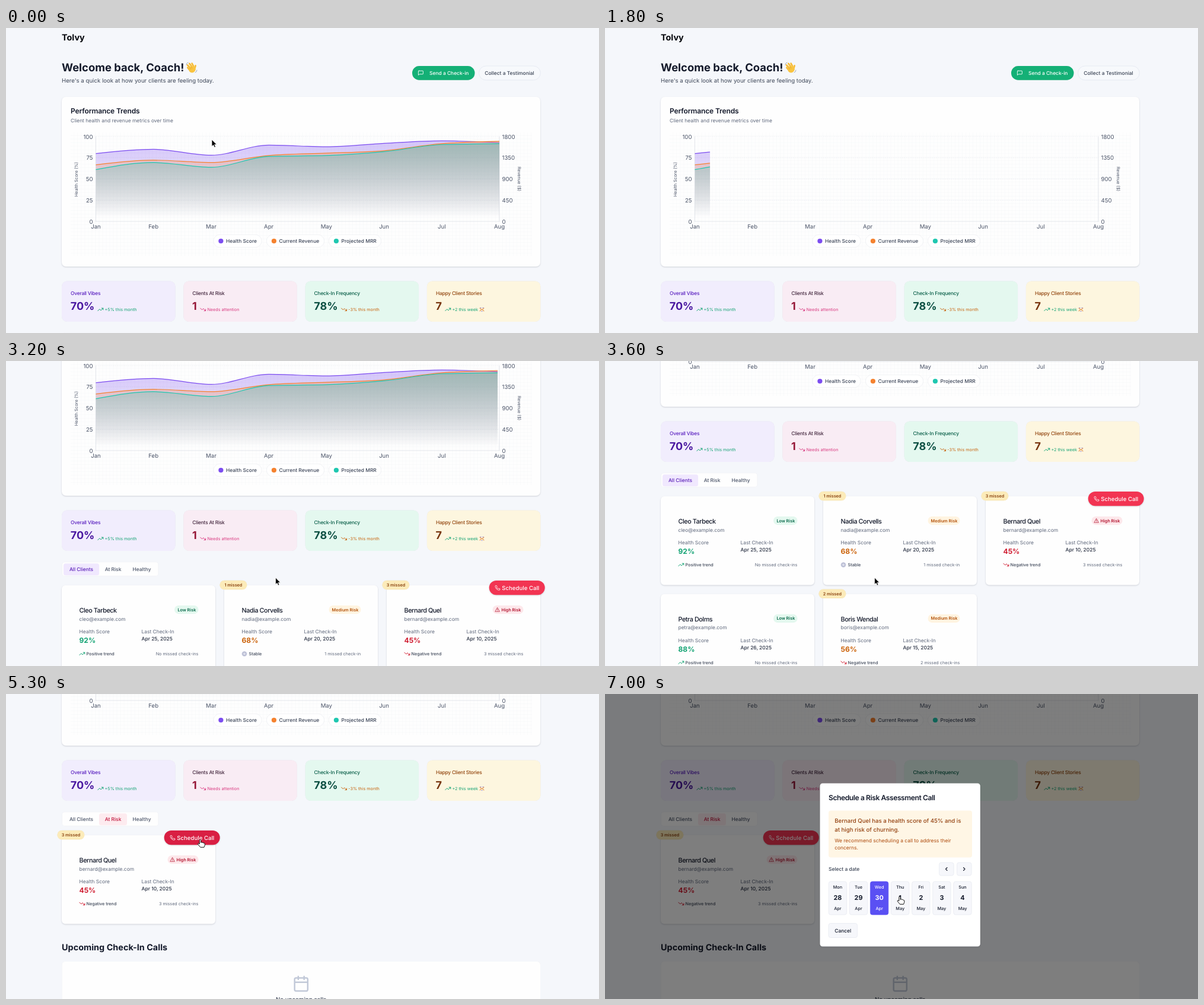
Recreate the animation shown at these times as an HTML page. Size 1000x514 px, loop 7.1 s.

```html
<!DOCTYPE html>
<html lang="en">
<head>
<meta charset="utf-8">
<title>Coach dashboard</title>
<style>
html, body { margin: 0; width: 100%; height: 100%; overflow: hidden; background: #f5f7fb; }
svg { display: block; width: 100%; height: 100%; }
text { font-family: Inter, "Open Sans", sans-serif; text-rendering: geometricPrecision; white-space: pre; }
.card { filter: drop-shadow(0 1.2px 1.3px rgba(15, 23, 42, .17)); }
.soft { filter: drop-shadow(0 .6px .7px rgba(15, 23, 42, .1)); }
.line { fill: none; stroke-linecap: round; stroke-linejoin: round; }
</style>
</head>
<body>
<svg id="stage" viewBox="0 0 1000 514" preserveAspectRatio="none"></svg>
<script>
const LOOP = 7100, STEP = 100;
const XS = 7.22, SM = 8.43, MD = 9.63, LG = 10.84, XL = 12.04, H2 = 14.45, H1 = 18.06;
const INK = '#141a2b', SLATE = '#4b5468', MUTED = '#5f687c';
const GREEN = '#14a374', RED = '#d01f33', ORANGE = '#cc640c';

// Drawing helpers
const text = (x, y, size, str, fill = INK, weight = 400, more = '') =>
  `<text x="${x}" y="${y}" font-size="${size}" fill="${fill}" font-weight="${weight}" ${more}>${str}</text>`;
const mid = 'text-anchor="middle"', end = 'text-anchor="end"';
const track = v => `letter-spacing="${v}"`;
const box = (x, y, w, h, r, fill, more = '') =>
  `<rect x="${x}" y="${y}" width="${w}" height="${h}" rx="${r}" fill="${fill}" ${more}/>`;
const line = (d, color, width = 1, more = '') =>
  `<path class="line" d="${d}" stroke="${color}" stroke-width="${width}" ${more}/>`;
const icon = (x, y, scale, d, color, width = 2) =>
  `<g transform="translate(${x} ${y}) scale(${scale})">${line(d, color, width)}</g>`;
const group = (id, body) => `<g id="${id}">${body}</g>`;

const UP = 'M2 17L8.5 10.5L13.5 15.5L22 7M16 7H22V13';
const DOWN = 'M2 7L8.5 13.5L13.5 8.5L22 17M16 17H22V11';
const PHONE = 'M22 17v3a2 2 0 0 1-2 2C10 22 2 13 2 4a2 2 0 0 1 2-2h3a2 2 0 0 1 2 2l1 4-2 3a16 16 0 0 0 5 5l3-2 4 1a2 2 0 0 1 2 2z';
const ALERT = 'M12 3L22 21H2ZM12 9V14M12 17.5V18';
const CHAT = 'M4 3H20Q22 3 22 5V15Q22 17 20 17H7L2 21V5Q2 3 4 3Z';
const CALENDAR = 'M5 4H19Q21 4 21 6V20Q21 22 19 22H5Q3 22 3 20V6Q3 4 5 4ZM3 10H21M8 2V6M16 2V6';

// Chart
const LEFT = 151.5, WIDE = 680.5, TOP = 183, BASE = 326, GAP = WIDE / 7;
const series = [
  { id: 'health', name: 'Health Score', color: '#7c4df0', max: 100, data: [80, 85, 78, 90, 88, 92, 95, 93], x: 350, w: 81 },
  { id: 'now', name: 'Current Revenue', color: '#f5822f', max: 1800, data: [1200, 1300, 1250, 1400, 1450, 1500, 1650, 1700], x: 439.5, w: 97 },
  { id: 'mrr', name: 'Projected MRR', color: '#1fc7b0', max: 1800, data: [1100, 1250, 1150, 1380, 1400, 1480, 1630, 1650], x: 544.5, w: 88 }
];

// Monotone cubic through evenly spaced points
function curve(s) {
  const y = s.data.map(v => BASE - v / s.max * (BASE - TOP));
  const d = y.slice(1).map((v, i) => v - y[i]);
  const m = y.map((_, i) => {
    if (i === 0 || i === 7) return 0;
    const a = d[i - 1], b = d[i];
    return a * b <= 0 ? 0 : Math.sign(a) * Math.min(Math.abs(a), Math.abs(b), Math.abs(a + b) / 4) * 2;
  });
  m[0] = (3 * d[0] - m[1]) / 2;
  m[7] = (3 * d[6] - m[6]) / 2;
  let path = `M${LEFT} ${y[0]}`;
  for (let i = 0; i < 7; i++) {
    const x = LEFT + i * GAP;
    path += `C${x + GAP / 3} ${y[i] + m[i] / 3} ${x + GAP * 2 / 3} ${y[i + 1] - m[i + 1] / 3} ${x + GAP} ${y[i + 1]}`;
  }
  return path;
}

function chart() {
  let out = box(109, 176, 778, 208, 0, 'url(#mesh)');
  for (let i = 0; i < 5; i++) {
    const y = BASE - i * (BASE - TOP) / 4;
    out += line(`M${LEFT} ${y}H${LEFT + WIDE}`, i ? '#eceef2' : '#dde0e6', .7, i ? 'stroke-dasharray="1.8 1.8"' : '');
    out += text(146.5, y + 3.5, MD, i * 25, SLATE, 400, end) + text(836.5, y + 3.5, MD, i * 450, SLATE);
  }
  out += line(`M${LEFT} ${TOP}V${BASE}M${LEFT + WIDE} ${TOP}V${BASE}`, '#d9dce3', .7);
  ['Jan', 'Feb', 'Mar', 'Apr', 'May', 'Jun', 'Jul', 'Aug'].forEach((name, i) => {
    out += text(LEFT + i * GAP, 338, MD, name, SLATE, 400, mid);
  });
  out += text(0, 0, XS, 'Health Score (%)', SLATE, 400, mid + ' transform="translate(121 255) rotate(-90)"');
  out += text(0, 0, XS, 'Revenue ($)', SLATE, 400, mid + ' transform="translate(862.5 254.5) rotate(90)"');
  out += '<g clip-path="url(#reveal)">' + series.map(s => {
    const d = curve(s);
    return `<path d="${d}V${BASE}H${LEFT}Z" fill="url(#${s.id})"/>` + line(d, s.color, 1.2);
  }).join('') + '</g>';
  series.forEach(s => {
    out += box(s.x, 348.5, s.w, 21, 10.5, '#fff', 'class="soft" stroke="#f1f3f6" stroke-width=".6"');
    out += `<circle cx="${s.x + 12.4}" cy="359" r="4.1" fill="${s.color}"/>` + text(s.x + 21, 362, SM, s.name, '#3c4558', 500);
  });
  return out;
}

function wave() {
  const hand = line('M-5 1L-6-3M-2-1L-4.5-7M1-2L-.5-8M4-1L3.5-6.5', '#f7bd38', 2.7)
    + line('M4.5 3L7.5-.5', '#f7bd38', 2.7)
    + '<ellipse cx="-.2" cy="3" rx="5.8" ry="5.3" fill="#f9c440"/>'
    + line('M-3.4-1L-2 1.5M-.5-2L.5 1', '#dc9520', .6);
  return `<g transform="translate(313 67) rotate(-24)">${hand}</g>`
    + line('M304 62Q304 59 307 58M319 75Q322 74 322 71', '#8d97a5', .8);
}

function header() {
  return text(94, 21.3, H2, 'Tolvy', '#05070c', 700)
    + text(94, 73.3, 18.4, 'Welcome back, Coach!', INK, 700) + wave()
    + text(94, 92.3, MD, 'Here\'s a quick look at how your clients are feeling today.', '#3f4859')
    + box(685, 64, 105.5, 23.8, 11.9, '#14b076', 'class="soft"') + icon(694.6, 71, .4, CHAT, '#fff', 2.2)
    + text(714, 79, SM, 'Send a Check-in', '#fff', 500)
    + box(797.5, 64, 103.8, 23.8, 11.9, '#f7f9fc', 'stroke="#e3e8f0" stroke-width=".8"')
    + text(807.3, 79, SM, 'Collect a Testimonial', '#3a4354', 500)
    + box(94, 116, 807, 286, 7, '#fefefe', 'class="card"')
    + text(109, 143.5, XL, 'Performance Trends', INK, 600, track(-.14))
    + text(109, 158.6, SM, 'Client health and revenue metrics over time', MUTED);
}

const stats = [
  ['Overall Vibes', '70%', '+5% this month', '#f1edfd', '#5b21c0', '#4a18a0', GREEN, UP, 60],
  ['Clients At Risk', '1', 'Needs attention', '#f9ecf4', '#44283f', '#961838', '#d93a80', DOWN, 27.5],
  ['Check-In Frequency', '78%', '-3% this month', '#e4f8ef', '#0a5f49', '#0b4f42', '#c96511', DOWN, 60],
  ['Happy Client Stories', '7', '+2 this week', '#fdf6df', '#92450e', '#78350f', GREEN, UP, 30]
];
const statCards = () => stats.map(([label, value, note, bg, c1, c2, c3, trend, dx], i) => {
  const x = 94 + i * 205.3;
  return box(x, 426.5, 191.5, 68.5, 9, bg, 'class="soft"')
    + text(x + 15, 450.2, SM, label, c1, 500, track(-.23))
    + text(x + 14.7, 475.2, H1, value, c2, 700)
    + icon(x + dx, 469, .45, trend, c3, 2.2) + text(x + dx + 12.6, 477.2, XS, note, c3);
}).join('')
  + line('M799 472L802 474.5L799 477M806 472L803 474.5L806 477', '#e59a55', 1.1)
  + line('M800 471.5H801M804 471.5H805M802 477.5H803', '#8a7bd0', 1.1);

// Clients: name, mailbox, risk level, score, date, missed check-ins
const clients = [
  ['Cleo Tarbeck', 'cleo', 0, 92, 25, 0],
  ['Nadia Corvells', 'nadia', 1, 68, 20, 1],
  ['Bernard Quel', 'bernard', 2, 45, 10, 3],
  ['Petra Dolms', 'petra', 0, 88, 26, 0],
  ['Boris Wendal', 'boris', 1, 56, 15, 2]
];
const levels = [
  ['Low Risk', 40.5, '#e4f8ef', '#0c6b4d', GREEN],
  ['Medium Risk', 54, '#fff4e1', '#b3520a', ORANGE],
  ['High Risk', 52, '#fde8eb', '#b31530', RED]
];

function clientCard([name, mail, risk, score, day, missed], slot, callId) {
  const [label, w, bg, fg, tone] = levels[risk];
  const stable = missed === 1, bad = missed > 1;
  let out = box(0, 0, 259, 149.5, 6, '#fefefe', 'class="card"')
    + text(29.5, 46.2, LG, name, INK, 500, track(-.45))
    + text(29.5, 59.7, SM, mail + '@example.com', MUTED)
    + box(230.5 - w, 34, w, 14.2, 7.1, bg)
    + text(226.3, 43.6, XS, label, fg, 600, end)
    + text(29.5, 81.3, SM, 'Health Score', MUTED) + text(134.5, 81.3, SM, 'Last Check-In', MUTED)
    + text(29.5, 97, XL, score + '%', tone, 700)
    + text(134.5, 93.3, SM, `Apr ${day}, 2025`, '#262e40', 500)
    + text(41.5, 118, XS, stable ? 'Stable' : bad ? 'Negative trend' : 'Positive trend', '#3d4658', 500)
    + text(230.3, 118, XS, missed ? `${missed} missed check-in${bad ? 's' : ''}` : 'No missed check-ins', MUTED, 400, end);
  out += stable
    ? '<circle cx="34" cy="115.5" r="4.6" fill="#d9dbe9"/><circle cx="34" cy="115.5" r="3" fill="none" stroke="#a3a8c4"/>'
    : icon(29, 110, .45, bad ? DOWN : UP, bad ? RED : GREEN, 2.2);
  if (risk === 2) {
    out += icon(182.5, 36.7, .36, ALERT, fg)
      + box(172.7, -8, 94, 24.2, 12.1, '#f23452', `id="${callId}" class="card"`)
      + icon(182.3, -.2, .38, PHONE, '#fff', 2.2) + text(194.3, 7.6, MD, 'Schedule Call', '#fff', 500);
  }
  if (missed) out += box(-7.6, -8.2, 46, 15.4, 7.7, '#fcebb9', 'class="soft"')
    + text(15.4, 1.8, XS, missed + ' missed', '#8a4310', 600, mid);
  return `<g transform="translate(${94 + slot % 3 * 274} ${553 + (slot > 2 ? 164.8 : 0)})">${out}</g>`;
}

function tabs(active) {
  const items = [['All Clients', 97, 60, '#f0e8fe', '#5a1fb8'], ['At Risk', 157, 47, '#fdebef', '#c0163c'], ['Healthy', 204, 50]];
  return box(94.5, 513.8, 162.5, 23.6, 4, '#fefefe', 'stroke="#eceff4" stroke-width=".6"')
    + items.map(([name, x, w, bg, fg], i) =>
      (i === active ? box(x, 516.3, w, 20, 3.5, bg) : '')
      + text(x + w / 2, 529.2, SM, name, i === active ? fg : SLATE, 500, mid)).join('');
}

const upcoming = dy => `<g transform="translate(0 ${dy})">`
  + text(94, 747, H2, 'Upcoming Check-In Calls', INK, 700)
  + box(94.3, 766, 806.7, 150, 5, '#fefefe', 'class="soft"')
  + icon(483, 788.5, 1.23, CALENDAR, '#c2c9d8', 2)
  + text(497.7, 833, MD, 'No upcoming calls', '#3d4658', 500, mid) + '</g>';

function modal() {
  const panel = (x, y, w, h, id = '') => box(x, y, w, h, 3.5, '#f6f7fb', `stroke="#e6e9ef" stroke-width=".7" ${id}`);
  let out = box(362.5, 150.5, 270.3, 275, 4.5, '#fff', 'class="card"')
    + text(377, 178.5, XL, 'Schedule a Risk Assessment Call', INK, 600, track(-.4))
    + box(377, 196.5, 242, 79, 4, '#fff6e5')
    + text(387.2, 217, MD, 'Bernard Quel has a health score of 45% and is', '#93400f', 500)
    + text(387.2, 231.6, MD, 'at high risk of churning.', '#93400f', 500)
    + text(387.2, 249.5, SM, 'We recommend scheduling a call to address their', '#ad4b0d')
    + text(387.2, 261.5, SM, 'concerns.', '#ad4b0d')
    + text(377, 298.4, SM, 'Select a date', '#3a4354', 500)
    + panel(563.5, 284, 24.6, 22) + panel(593.5, 284, 24.6, 22)
    + line('M577 292.5L574.5 295L577 297.5M604.5 292.5L607 295L604.5 297.5', INK, 1.1)
    + panel(377, 386.5, 48.5, 24) + text(401.2, 401.5, SM, 'Cancel', INK, 500, mid);
  ['Mon', 'Tue', 'Wed', 'Thu', 'Fri', 'Sat', 'Sun'].forEach((name, i) => {
    const x = 377.2 + i * 35.1, c = x + 15.2;
    const label = text(c, 328, XS, name, 'inherit', 500, mid)
      + text(c, 347.4, LG, i < 3 ? 28 + i : i - 2, 'inherit', 700, mid)
      + text(c, 364, XS, i < 3 ? 'Apr' : 'May', 'inherit', 500, mid);
    out += panel(x, 316, 30.4, 56, `id="cell${i}"`) + `<g id="label${i}" fill="${INK}">${label}</g>`;
  });
  return out;
}

const cursors = `<path id="arrow" d="M0 0V11.6L2.7 9.2L4.5 13.2L6.5 12.3L4.7 8.5H8.3Z" fill="#000" stroke="#fff" stroke-width=".8"/>
<path id="hand" d="M-1.2 1Q-1.2-.2 0-.2T1.2 1V5Q1.5 4 2.5 4.2Q3.6 4.3 3.7 5.2Q4.4 4.5 5.3 4.9Q6 5.1 6.1 6Q7.8 5.6 7.9 7.2Q8 10 6.5 12.8H.3Q-1.2 10.8-3.8 7.8Q-4.2 6.5-3 6.3Q-2 6.4-1.2 7.5Z" fill="#fff" stroke="#111" stroke-width="1" stroke-linejoin="round"/>`;

const fade = s => `<linearGradient id="${s.id}" x1="0" y1="0" x2="0" y2="1">`
  + `<stop offset=".05" stop-color="${s.color}" stop-opacity=".31"/>`
  + `<stop offset=".95" stop-color="${s.color}" stop-opacity="0"/></linearGradient>`;

stage.innerHTML = '<defs>' + series.map(fade).join('')
  + `<pattern id="mesh" width="6.02" height="6.02" patternUnits="userSpaceOnUse">${line('M0 .3H6.02M.3 0V6.02', '#f5f6f8', .6)}</pattern>`
  + `<clipPath id="reveal"><rect id="sweep" x="${LEFT}" y="100" width="${WIDE}" height="240"/></clipPath></defs>`
  + box(0, 0, 1000, 514, 0, '#f5f7fb')
  + group('page', header() + chart() + statCards()
    + group('all', tabs(0) + clients.map((c, i) => clientCard(c, i, 'callAll')).join('') + upcoming(164.8))
    + group('risk', tabs(1) + clientCard(clients[2], 0, 'call') + upcoming(0)))
  + group('shade', box(0, 0, 1000, 514, 0, '#000'))
  + group('dialog', modal()) + group('pointer', cursors);

// Motion
const el = id => document.getElementById(id);
const clamp = v => Math.max(0, Math.min(1, v));
const smooth = v => v * v * (3 - 2 * v);

function along(keys, t, ease = v => v) {
  let i = 0;
  while (i < keys.length - 2 && t >= keys[i + 1][0]) i++;
  const a = keys[i], b = keys[i + 1], k = ease(clamp((t - a[0]) / (b[0] - a[0])));
  return a.slice(1).map((v, j) => v + (b[j + 1] - v) * k);
}

function bezier(x1, y1, x2, y2, t) {
  const at = (a, b, s) => 3 * (1 - s) * (1 - s) * s * a + 3 * (1 - s) * s * s * b + s * s * s;
  let lo = 0, hi = 1;
  for (let i = 0; i < 24; i++) {
    const s = (lo + hi) / 2;
    if (at(x1, x2, s) < t) lo = s; else hi = s;
  }
  return at(y1, y2, lo);
}

const scrollKeys = [[2700, 0], [3200, 175], [3600, 325], [3800, 325], [4000, 315]];
const pointerKeys = [[100, 347, 188], [700, 41, -16], [2200, 300, 150], [2500, 454.5, 365], [3900, 454.5, 365],
  [4500, 181, 208], [4800, 181, 208], [5200, 327.5, 245.5], [5800, 327.5, 245.5], [6400, 462, 341],
  [6700, 462, 341], [6900, 497, 341.5], [7100, 497, 341.5]];

const show = (id, on) => { el(id).style.display = on ? '' : 'none'; };

function draw(t) {
  const grow = t < 1650 ? 1 : bezier(.4, .2, .5, 1, clamp((t - 1700) / 1600));
  el('sweep').setAttribute('width', WIDE * grow);
  el('page').setAttribute('transform', `translate(0 ${-along(scrollKeys, t)[0]})`);
  show('all', t < 4600);
  show('risk', t >= 4600);
  el('call').setAttribute('fill', t >= 5100 && t < 5500 ? '#d91f43' : '#f23452');

  const open = smooth(clamp((t - 5400) / 200)), zoom = .95 + .05 * open;
  show('shade', open > 0);
  show('dialog', open > 0);
  el('shade').setAttribute('opacity', .5 * open);
  el('dialog').setAttribute('opacity', open);
  el('dialog').setAttribute('transform', `translate(497.6 288) scale(${zoom}) translate(-497.6 -288)`);

  const picked = t >= 6700;
  el('cell2').setAttribute('fill', picked ? '#5a50f3' : '#f6f7fb');
  el('cell2').setAttribute('stroke', picked ? '#5a50f3' : '#e6e9ef');
  el('label2').setAttribute('fill', picked ? '#fff' : INK);

  const [x, y] = along(pointerKeys, t, smooth);
  const link = (t >= 4400 && t < 4900) || (t >= 5100 && t < 5600) || t >= 6200;
  show('pointer', t < 700 || t >= 2200);
  show('arrow', !link);
  show('hand', link);
  el('pointer').setAttribute('transform', `translate(${x} ${y})`);
}

const start = performance.now();
function tick() {
  const t = (performance.now() - start) % LOOP;
  draw(Math.floor(t / STEP) * STEP);
  requestAnimationFrame(tick);
}
tick();
</script>
</body>
</html>
```
